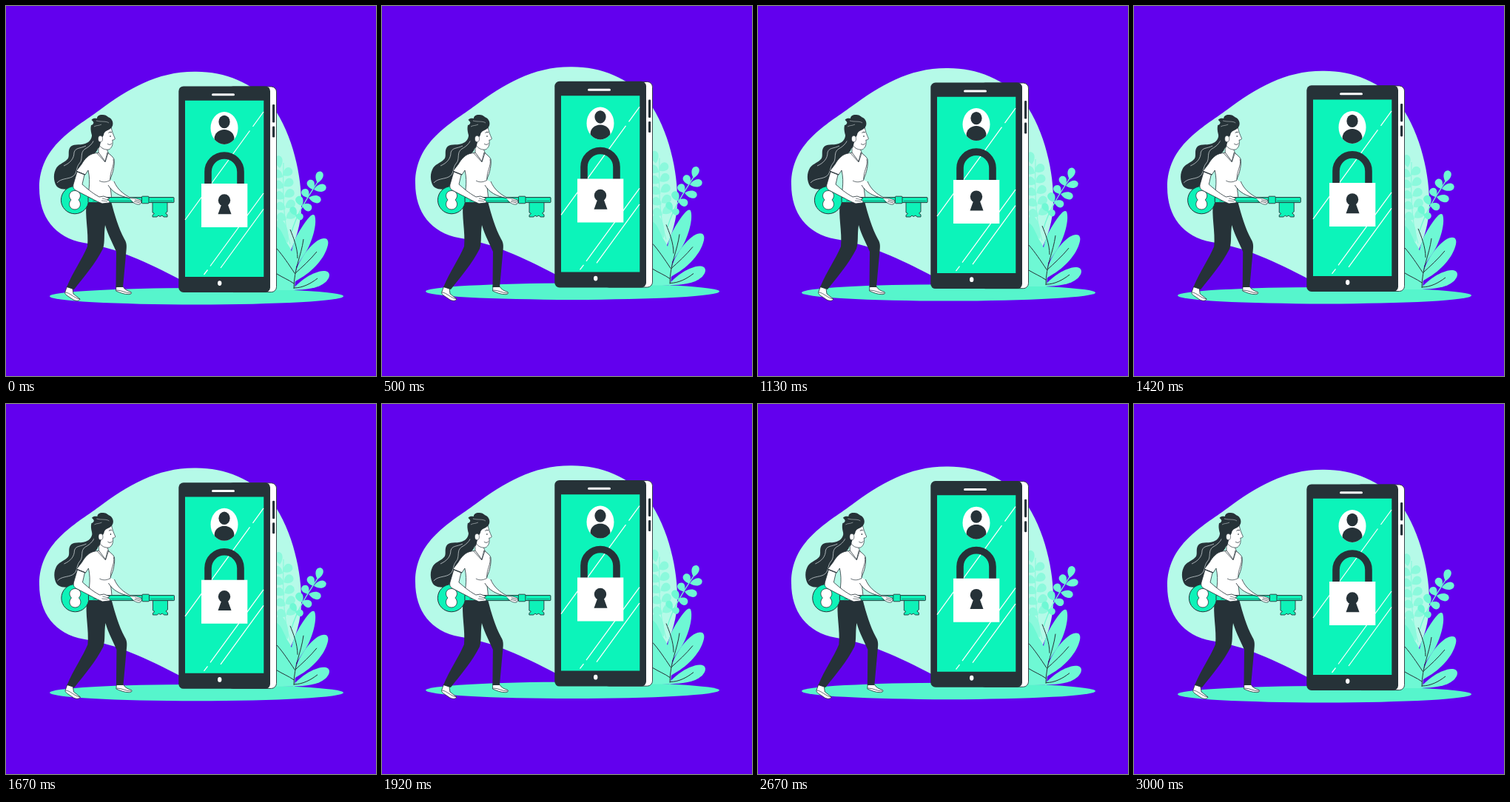
An HTML page with a canvas that plays this animation: 500 by 500 pixels, repeating every 3040 ms.

```html
<!DOCTYPE html>
<html lang="en">
<head>
<meta charset="utf-8">
<title>Unlocking a phone</title>
<style>
html, body { margin: 0; width: 100%; height: 100%; overflow: hidden; background: #6200ee; }
canvas { display: block; width: 100vmin; height: 100vmin; }
</style>
</head>
<body>
<canvas id="stage" width="500" height="500"></canvas>
<script>
const ctx = document.getElementById('stage').getContext('2d');
const BG = '#6200ee', DARK = '#263238', WHITE = '#fff', MINT = '#0ef2b8';
const SCREEN = '#0cf4ba', PALE = '#b5fae8', LEAF = '#6ef8d4', GROUND = '#56f5cc';
const LOOP = 3040, FRAME = 1000 / 24;

function paint(path, fill, stroke, width = 1) {
  if (fill) { ctx.fillStyle = fill; ctx.fill(path); }
  if (stroke) { ctx.strokeStyle = stroke; ctx.lineWidth = width; ctx.stroke(path); }
}
const shape = (d, fill, stroke, width) => paint(new Path2D(d), fill, stroke, width);

function oval(x, y, rx, ry, fill, stroke, width) {
  const p = new Path2D();
  p.ellipse(x, y, rx, ry, 0, 0, Math.PI * 2);
  paint(p, fill, stroke, width);
}

function box(x, y, w, h, r, fill, stroke, width) {
  const p = new Path2D();
  p.roundRect(x, y, w, h, r);
  paint(p, fill, stroke, width);
}

// Leaf from its stalk to its tip, widest nearer the tip.
function leaf(x, y, len, angle, width, fill) {
  ctx.save();
  ctx.translate(x, y);
  ctx.rotate(angle * Math.PI / 180);
  shape(`M0 0C${len * .35} ${-width * .7} ${len * .95} ${-width * .8} ${len} 0C${len * .95} ${width * .8} ${len * .35} ${width * .7} 0 0Z`, fill);
  ctx.restore();
}

function backdrop() {
  shape('M257 88.8C205 88 165 112 126 141C92 166 45 190 45 246C45 285 66 313 105 320C150 327 190 346 236 370L340 384C370 366 399 318 399 270C400 232 388 174 360 135C333 103 296 89 257 88.8Z', PALE);
  oval(257.5, 392.3, 198.5, 11.2, GROUND);
}

function plants() {
  // Faint sprig behind the phone
  const faint = '#8bf9dc';
  shape('M384 322C374 290 374 250 375 212', null, faint, 1.2);
  leaf(370, 219, 17, -98, 9, faint);
  for (let i = 0; i < 5; i++) {
    const x = 374 + i * 1.2, y = 229 + i * 14.5;
    leaf(x, y, 15, -35, 10, faint);
    leaf(x, y + 2, 14, -150, 10, faint);
  }
  leaf(381, 320, 34, -112, 11, faint);

  // Thin branch on the right
  shape('M386 305C394 278 409 257 421 238', null, LEAF, 1.3);
  leaf(421, 239, 16, -75, 9, LEAF);
  leaf(415, 248, 14, -112, 9, LEAF);
  leaf(416, 248, 17, -12, 9, LEAF);
  leaf(408, 259, 13, -118, 9, LEAF);
  leaf(409, 259, 17, 12, 9, LEAF);
  leaf(400, 270, 14, -115, 9, LEAF);
  leaf(400, 269, 14, 22, 9, LEAF);
  leaf(392, 283, 13, -120, 8, LEAF);
  leaf(391, 283, 11, 15, 8, LEAF);

  // Broad leaves
  shape('M390 384H362L362 299C369 294 374 309 380 321C387 331 391 343 392 352Z', LEAF);
  shape('M388 358C381 333 389 315 401 297C407 288 414 279 417 283C421 293 414 318 405 333Z', LEAF);
  shape('M388 374C391 349 407 327 421 317C431 311 437 314 435 323C431 341 414 359 396 369Z', LEAF);
  shape('M388 382C398 371 414 359 429 358C439 358 439 366 432 373C422 382 405 383 388 384Z', LEAF);
  shape('M389 382C389 355 399 338 402 315M390 362C400 353 411 343 420 332M389 381C401 381 412 375 421 368M394 341C394 326 388 312 384 302M390 361C382 349 374 337 366 328M389 375C382 370 374 367 366 362', null, DARK, 1);
}

function lock() {
  shape('M273 242V224A22 22 0 0 1 317 224V242', null, DARK, 9.6);
  box(264, 240, 62.3, 59, 0, WHITE);
  oval(295, 262.5, 8.2, 8.2, DARK);
  shape('M292 266L286.5 281.3H304.5L299 266Z', DARK);
}

function avatar() {
  oval(295, 165, 18.5, 22, WHITE);
  ctx.save();
  const clip = new Path2D();
  clip.ellipse(295, 165, 18.5, 22, 0, 0, Math.PI * 2);
  ctx.clip(clip);
  oval(295, 179, 13.4, 12, DARK);
  ctx.restore();
  oval(295, 156.8, 8.6, 10, WHITE);
  oval(295, 156.5, 7.6, 8.7, DARK);
}

function phone() {
  box(300, 109, 65.5, 277.6, 7, WHITE, DARK, .9);
  box(233.3, 108.4, 123.7, 278.6, 6.5, DARK);
  box(360, 133, 3.2, 24.5, 1.3, DARK);
  box(360, 162.5, 3.2, 15, 1.3, DARK);
  box(242, 127.7, 106.3, 238.3, 0, SCREEN);
  box(278, 118.3, 31, 3, 1.5, WHITE);
  oval(288.7, 374.6, 2.7, 3.4, WHITE);
  shape('M348 143L333.5 163M329.5 168.5L242 289M348 253L276 351.5M272.5 356.5L267.5 363M348 274.5L290 354', null, WHITE, 1.25);
  lock();
  avatar();
}

function hair() {
  shape('M124 155C117 157 114 164 116 171C117 179 113 184 107 186C99 189 90 185 86 192C83 198 87 204 82 208C78 212 70 214 67 221C63 229 65 241 70 245C76 249 85 248 92 246C100 243 96 234 101 228C106 222 113 216 113 209C113 202 122 200 124 193C129 188 128 180 129 172Z', DARK);
  shape('M121 172C121 183 113 190 107 193C99 198 105 207 99 213C94 219 97 227 89 231C83 234 74 233 69 239M108 189C100 193 94 191 92 198C92 206 87 212 78 216', null, '#dfe6e8', .7);
}

function head() {
  shape('M125 184L125 201L134 211L139 200L136 193Z', WHITE, DARK, .7);
  shape('M124 170C128 161 137 158 142 163C143 169 145 174 147.3 179C147 181 145 181 143.8 181C145 187 143 192 139 194C131 195 125 190 124 181Z', WHITE, DARK, .7);
  shape('M115.5 154C118 151 121 152 123 152C123 148 127 146.5 131 147C136 147 137 150 140 151C145 154 146 161 142 165C138 169 133 168 132 174C131 178 127 178 128 184L126 192L119 185C117 176 113 169 115 161C121 160 118 156 115.5 154Z', DARK);
  oval(127.5, 179.5, 3, 4.2, WHITE, DARK, .6);
  shape('M137 186C139 188 142 187.5 143 185.5', null, DARK, .8);
  shape('M138.5 171.5C140 170 142 170 143 171', null, DARK, .9);
  oval(141, 176, .7, 1.1, DARK);
  shape('M122 155C129 157 135 155 139 158M119 163C122 161 125 162 129 160', null, '#dfe6e8', .5);
}

function legs() {
  shape('M82.5 379L80 386C79 388 80 389 82 391L91 397C95 399 99 398.5 100 396L91 389L90 382Z', WHITE, DARK, .8);
  shape('M80 387C86 387 92 395 100 396', null, DARK, .7);
  shape('M149 378L148.5 385C153 387 160 390 166 389.7C169 389.5 170.5 388 169 386.5C164 385 160 383 158 379Z', WHITE, DARK, .8);
  shape('M149 384C157 384 161 388 169 388', null, DARK, .7);
  shape('M109 264H142C147 283 152 300 160 315C164 321 163 326 162 336L158 380H148.5L149 332C145 322 138 310 134 296C132 309 134 319 131 328C121 348 106 365 92 383L82 380C91 358 103 342 110 325C112 305 106 283 109 264Z', DARK);
}

function torso() {
  shape('M120 199C112 200 106 207 102 214L95 223L107 228L111 222C115 239 111 254 109 266H142C144 255 139 242 141 233C145 225 147 214 146 207C144 203 141 201 137 198L134 210L125 198Z', WHITE, DARK, .8);
  shape('M123 199L134 211L138 199M126 236C131 239 137 238 141 235', null, DARK, .7);
  shape('M141 234C140 224 147 216 145 207', null, DARK, .7);
  shape('M95 223.5L107 228', null, DARK, 1.2);
}

function key() {
  oval(93, 262.2, 18.6, 18.6, MINT, DARK, 1);
  shape('M88 262C83 257 86 249.5 93 249.5C100 249.5 103 257 98 262C103 267 100 275 93 275C86 275 83 267 88 262Z', WHITE, DARK, .8);
  shape('M198 264V279L200.5 280.5L198 282.5V285H204L206 283L208 284.5L211 283L213 285H218V282L215.5 280L218 278V264Z', MINT, DARK, .9);
  box(111, 258.6, 116, 7, .7, MINT, DARK, 1);
  box(183.5, 257.2, 9.5, 9.6, 1, MINT, DARK, .9);
  shape('M117 263.5H182M195 263.5H225', null, DARK, .5);
}

function arms() {
  shape('M96 224L91 241C90 246 92 248 96 250L123 264L130 267L139 266C141 265 140 263 137 262L140 260L132 257L126 258C115 252 109 246 103 241L106 228Z', WHITE, DARK, .8);
  shape('M130 260L138 262M129 263L137 264', null, DARK, .6);
  shape('M141 235L138 241C143 251 153 256 166 259L170 263C173 267 176 268 181 268L183 265L182 262L176 260L168 259C158 254 150 247 147 238Z', WHITE);
  shape('M138 242C143 251 153 257 168 260M146 237C150 247 158 254 168 259', null, DARK, .8);
  shape('M168 260L176 260L182 262L183 265L181 268C175 269 172 265 168 263M174 262L182 264M173 264L181 266', null, DARK, .7);
}

function woman() {
  hair();
  legs();
  head();
  torso();
  key();
  arms();
}

// Side-to-side position at each tenth of three seconds
const SHAKE = [0, -1, 2, -4, 4, -4, 4, -4, 2, -1, 0];
function shake(t) {
  const p = t / 300, i = Math.min(9, Math.floor(p));
  return SHAKE[i] + (SHAKE[i + 1] - SHAKE[i]) * (p - i);
}

const lift = t => -9.8 * (1 - Math.abs(1 - (t % 1500) / 750));

function shifted(x, y, draw) {
  ctx.save();
  ctx.translate(x, y);
  draw();
  ctx.restore();
}

function render(now) {
  const step = Math.min(72, Math.floor((now % LOOP + 4) / FRAME));
  const t = step * FRAME;
  ctx.fillStyle = BG;
  ctx.fillRect(0, 0, 500, 500);
  ctx.lineJoin = 'round';
  shifted(0, lift(t), () => { backdrop(); plants(); phone(); });
  shifted(shake(t), 0, woman);
}

const start = performance.now();
function tick() {
  render(performance.now() - start);
  requestAnimationFrame(tick);
}
tick();
</script>
</body>
</html>
```
